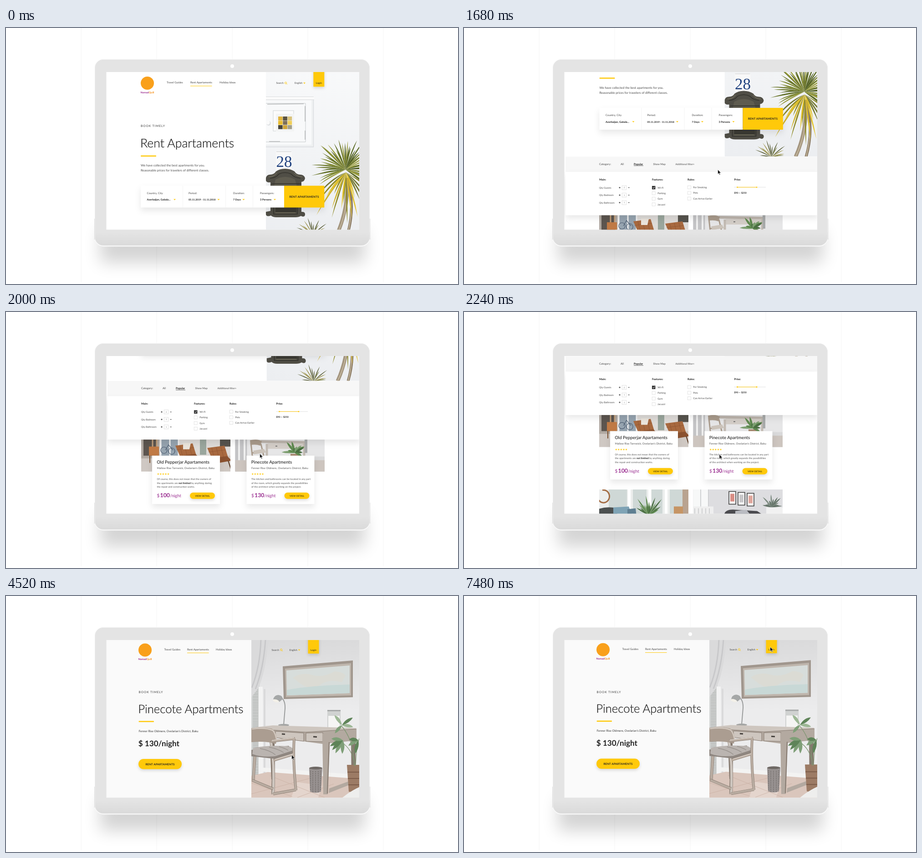
Write an HTML page that moves like this. It is 993 by 564 pixels and loops after 8 s.

```html
<!DOCTYPE html>
<html lang="en">
<head>
<meta charset="utf-8">
<title>Apartment booking</title>
<style>
html, body { margin: 0; width: 100%; height: 100%; overflow: hidden; background: #fff; }
#stage { display: block; width: 100vw; height: 100vh; font-family: Lato, "Open Sans", sans-serif; text-rendering: geometricPrecision; }
text { white-space: pre; }
.card { filter: drop-shadow(0 7px 7px rgba(0,0,0,.09)); }
.lift { filter: drop-shadow(0 3px 3px rgba(0,0,0,.14)); }
.title { font-weight: 300; stroke: #222; stroke-width: .3px; }
.star { font-family: "DejaVu Sans", sans-serif; }
.num { font-family: "Liberation Serif", serif; }
</style>
</head>
<body>
<svg id="stage" viewBox="0 0 993 564"></svg>
<script>
const YELLOW = '#ffc90a', PURPLE = '#98298e', INK = '#484848', DARK = '#222';

// Drawing helpers that return markup
const rect = (x, y, w, h, fill, more = '') => `<rect x="${x}" y="${y}" width="${w}" height="${h}" fill="${fill}" ${more}/>`;
const shape = (d, fill, more = '') => `<path d="${d}" fill="${fill}" ${more}/>`;
const line = (d, color, w = 1, more = '') => `<path d="${d}" fill="none" stroke="${color}" stroke-width="${w}" ${more}/>`;
const oval = (x, y, rx, ry, fill, more = '') => `<ellipse cx="${x}" cy="${y}" rx="${rx}" ry="${ry}" fill="${fill}" ${more}/>`;
const text = (x, y, size, str, fill = INK, more = '') => `<text x="${x}" y="${y}" font-size="${size}" fill="${fill}" ${more}>${str}</text>`;
const bold = (x, y, size, str, fill = DARK, more = '') => text(x, y, size, str, fill, 'font-weight="700" ' + more);
const title = (x, y, size, str) => text(x, y, size, str, DARK, 'class="title"');
const mid = 'text-anchor="middle"';
const photo = (x, y, w, h, art) =>
  `<svg x="${x}" y="${y}" width="${w}" height="${h}" viewBox="${x} ${y} ${w} ${h}">${art}</svg>`;
const caret = (x, y) => shape(`M${x - 2.5} ${y}h5l-2.5 2.7z`, YELLOW);
const fade = (id, a, b, y2 = 1) =>
  `<linearGradient id="${id}" x2="0" y2="${y2}"><stop stop-color="${a}"/><stop offset="1" stop-color="${b}"/></linearGradient>`;

let seed = 7;
const rnd = () => (seed = seed * 16807 % 2147483647) / 2147483647;

// A fan of n pointed leaves growing from one point; angles in degrees
function leaves(n, cx, cy, from, to, short, long, width, droop, colors) {
  let out = '';
  for (let i = 0; i < n; i++) {
    const a = (from + (to - from) * (i + rnd()) / n) * Math.PI / 180;
    const len = short + (long - short) * rnd(), c = Math.cos(a), s = Math.sin(a);
    const mx = cx + c * len * .55, my = cy + s * len * .55 - droop * .3;
    const tip = `${cx + c * len} ${cy + s * len + droop * rnd()}`;
    out += shape(`M${cx} ${cy}Q${mx - s * width} ${my + c * width} ${tip}Q${mx + s * width} ${my - c * width} ${cx} ${cy}`,
      colors[Math.floor(rnd() * colors.length)]);
  }
  return out;
}

function header([logo, guides, rent, ideas, search, lang, login], dy) {
  const nav = [[guides, 'Travel Guides'], [rent, 'Rent Apartaments'], [ideas, 'Holiday Ideas']];
  return `<g transform="translate(0 ${dy})">` +
    oval(logo, 121.5, 14.5, 14.5, '#f9a01b') +
    bold(logo, 143.5, 5.6, '<tspan>Nomad</tspan><tspan fill="#f5921e">Quill</tspan>', PURPLE, mid) +
    nav.map(([x, s]) => text(x, 122.3, 6.05, s)).join('') +
    rect(rent, 127.3, 47.5, 1, YELLOW) +
    text(search, 123.4, 5.6, 'Search') +
    line(`M${search + 22.5} 122.5l1.8 1.8`, YELLOW) +
    `<circle cx="${search + 21}" cy="121" r="2" fill="none" stroke="${YELLOW}"/>` +
    text(lang, 123.4, 5.6, 'English') + caret(lang + 21.5, 120.3) +
    rect(login, 85, 24, 44.3, YELLOW, 'class="lift"') +
    text(login + 12, 123.4, 5.5, 'Login', DARK, mid) + '</g>';
}

const kicker = (x, y) => text(x, y, 6.6, 'BOOK TIMELY', INK, 'letter-spacing=".95" font-weight="500"');

function doorPhoto() {
  const tiles = ['#e0b33c', '#5a5340', '#d9c27a', '#e9bd2f', '#7d705a', '#f0cf58', '#46443c', '#cfa63a', '#a3a08c'];
  return rect(571, 97, 205, 358, 'url(#wall)') +
    // cabinet
    rect(571, 158, 104, 104, '#eff1f2') + rect(571, 159, 100, 98, '#f8f9fa') +
    rect(571, 151, 106, 6, '#fbfbfb') + line('M571 158H677M571 151.5H676', '#d9dcde', 1.2) +
    line('M675.5 158V262M571 262H676', '#d9dcdf', 1.4) +
    line('M571 166H658V251H571', '#c6cacc', 1) + line('M574 168l80 -1M657 172v34M657 226v20M578 250h24', '#87898a', .8) +
    rect(587, 182, 45, 45, '#fbfbfb', 'stroke="#cfd3d5"') + rect(593, 189, 40, 39, '#f3f4f4') +
    tiles.map((c, i) => rect(598 + i % 3 * 10.3, 195 + Math.floor(i / 3) * 9.5, 9.6, 8.8, c)).join('') +
    oval(577, 210, 5, 5, '#dfe2e4') + oval(575.5, 208.5, 4.2, 4.2, '#fafafa') +
    // house number
    rect(593, 272, 35, 40, '#f8f8f8') + line('M594 272.5h33', '#cfcfcf') +
    text(611, 306, 35, '28', '#1f417f', mid + ' class="num"') +
    // letter box
    shape('M571 330q2-7 9-7q9 0 13-7q8-6 20-6t21 6q4 7 12 7q9 0 11 8q-1 7-8 8v66q9-1 8 7q-2 6-9 2q-5 3-12 3H594q-8 0-12-4q-9 4-11-2v-6l10-2V340q-9 1-10-4z', '#504e46') +
    shape('M592 334q21-12 43 0l4 14h-50z', '#5f5c50') + rect(592, 388, 46, 18, '#3b3a33') +
    line('M580 331q14-1 19-9q14-7 28 0q6 8 20 9M584 343H648M588 348v62h52v-62', '#33322c', 1.6) +
    line('M577 328q12 0 18-9M633 319q7 9 18 9M592 407h44', '#857f68', 1) +
    // palm
    line('M750 330Q752 400 727 455', '#a3957f', 8) + line('M750 330Q768 395 750 455', '#8b7b65', 6) +
    line('M748 380Q744 420 727 455M757 380Q761 415 750 455', '#c5b79e', 2) +
    leaves(17, 747, 318, 35, 150, 45, 112, 3, 18, ['#d0b32a', '#8d8926', '#e2c126', '#757a34', '#b39a30']) +
    leaves(46, 746, 312, 150, 400, 48, 80, 2.5, 8, ['#5c6b25', '#7d872f', '#4c5a22', '#979a3a', '#6a7629']) +
    leaves(14, 674, 456, 185, 355, 24, 45, 1.6, 4, ['#767b3a', '#9a914a', '#4d5228']);
}

function home() {
  const fields = [[309.5, 370.5, 'Country, City', 'Azerbaijan, Gabala...', 5.8], [401, 467, 'Period:', '05.11.2019 - 11.11.2018', 5.35],
    [499, 522, 'Duration:', '7 Days', 5.6], [558, 590.5, 'Passengers:', '3 Persons', 5.8]];
  return rect(210, 60, 580, 1000, '#fff') +
    photo(571, 97, 206, 357.5, doorPhoto()) +
    header([310.5, 353, 405, 469, 593.5, 634, 675.3], 0) +
    kicker(296, 218.4) +
    title(295, 262.5, 26.7, 'Rent Apartaments') +
    rect(296, 280.7, 34, 2.6, YELLOW, 'rx="1"') +
    text(296, 305.3, 6.8, 'We have collected the best apartments for you.') +
    text(296, 316, 6.8, 'Reasonable prices for travelers of different classes.') +
    `<g class="card">${rect(296, 347.5, 315, 48, '#fff')}${rect(611, 347.5, 88.3, 48, YELLOW)}</g>` +
    line('M388.5 347.5v48M482.5 347.5v48M542.5 347.5v48', '#f3f3f3') +
    fields.map(([x, c, a, b, size]) => text(x, 365.8, 6.05, a) + bold(x, 380.2, size, b) + caret(c, 376.8)).join('') +
    bold(655, 373.8, 6.2, 'RENT APARTAMENTS', DARK, mid + ' letter-spacing=".2"') +
    `<g transform="translate(-1.5 357.5)">${listing()}</g>`;
}

function filters() {
  const box = (x, y) => rect(x, y - 3.5, 7, 7, '#fff', 'stroke="#dcdcdc" stroke-width=".8"');
  const rows = [['Qty Guests', 2], ['Qty Badroom', 1], ['Qty Bathroom', 1]];
  const checks = (x, y, list) => list.map((s, i) => box(x, y + i * 12.35) + text(x + 12, y + 2 + i * 12.35, 5.5, s)).join('');
  return rect(223, 97.5, 555, 34, '#f7f7f7') + rect(223, 131, 555, 95.5, '#fff', 'class="card"') +
    text(297, 115.8, 6.1, 'Category:') + text(344, 115.8, 6.1, 'All') +
    bold(373, 115.8, 5.9, 'Popular') + line('M373 117.3h21', DARK, .7) +
    bold(415.5, 115.8, 5.8, 'Show Map', '#707070') + bold(464.5, 115.8, 5.5, 'Additional filter+', '#707070') +
    [[297, 'Main:'], [413, 'Features:'], [491, 'Rules:'], [593.5, 'Prise:']].map(([x, s]) => bold(x, 149.6, 6, s)).join('') +
    rows.map(([s, n], i) => {
      const y = 165.7 + i * 16.5;
      return text(297, y + 2, 5.4, s) + line(`M340.3 ${y}h3.4m-1.7-1.7v3.4M360.5 ${y}h3.2`, DARK, .9) +
        rect(347.2, y - 4.5, 9.5, 9, '#fff', 'stroke="#dadada" stroke-width=".8"') + text(352, y + 1.7, 4.6, n, '#888', mid);
    }).join('') +
    checks(413.2, 165.5, ['Wi-Fi', 'Parking', 'Gym', 'Jacuzzi']) +
    rect(413, 162, 7.4, 7.4, '#333') + line('M414.7 165.6l1.6 1.7 2.6-3.2', '#fff', 1) +
    checks(491.5, 165, ['For Smoking', 'Pets', 'Can Arrive Earlier']) +
    line('M593.5 164.8h69.5', '#ddd', .9) + line('M600 164.8h43', YELLOW, 1) +
    oval(600.5, 164.8, 1.4, 1.4, YELLOW) + oval(643, 164.8, 1.4, 1.4, YELLOW) +
    bold(593.5, 178.6, 5.1, '$90 — $250');
}

function card(x, id, name, address, lines, price) {
  const t = x + 10.5;
  return rect(x, 262, 149, 106.5, '#fff', 'class="card"') +
    text(t - .3, 279.2, 9.7, name, DARK, 'font-weight="500"') +
    text(t, 291.8, 6.05, address, '#555') +
    text(t, 304.6, 6.2, '★★★★★', YELLOW, 'class="star"') +
    lines.map((s, i) => text(t, 315.6 + i * 8.4, 5.55, s, '#555')).join('') +
    text(t, 353.3, 10, `$<tspan x="${t + 7}" font-size="12.3" font-weight="700">${price}</tspan><tspan font-size="9.4">/night</tspan>`, PURPLE) +
    rect(x + 83, 343.2, 55, 14, YELLOW, `rx="7" class="lift" id="${id}"`) +
    bold(x + 110.5, 352.2, 5, 'VIEW DETAIL', '#4a3c08', mid + ' letter-spacing=".1"');
}

function listing() {
  const leather = '#a8693f', green = ['#5f8a50', '#4a6e42', '#7c9e70'];
  const armchair = (x, y) => shape(`M${x} ${y}l38-5 8 26-34 6z`, leather) + shape(`M${x + 8} ${y + 23}l36-5 10 10-40 7z`, '#8b5230') +
    line(`M${x + 10} ${y}l6 24M${x + 20} ${y - 1}l6 24M${x + 30} ${y - 2}l6 22M${x + 3} ${y + 9}l38-5`, '#8b5230', .7) +
    line(`M${x + 16} ${y + 34}l-6 16M${x + 46} ${y + 28}l6 18`, '#5a3a24', 2);
  const lounge = rect(297, 160, 197, 140, '#dedbd8') + rect(297, 262, 197, 35, '#cfc8c3') +
    rect(297, 222, 40, 46, '#b1a9a2') + rect(302, 222, 30, 40, '#5c554f') + line('M322 222v44M331 222v44', '#c2a07c', 3) +
    rect(339, 222, 40, 41, '#96a4b0') + line('M340 222v40M360 222v40M379 222v40', '#f2f2f2', 3) +
    line('M347 243a7 7 0 1 0 .1 0M364 245a7 7 0 1 0 .1 0M350 250l7-12 10 12', '#4c5c70', 1.2) +
    rect(426, 222, 14, 38, '#9aa69d') + rect(470, 222, 23, 20, '#57544e') +
    rect(314, 242, 22, 20, '#c07a45') + line('M316 262v16M334 262v16', '#7a5030', 2) +
    armchair(372, 240) + armchair(442, 245) + shape('M389 234h17l-3 14h-14z', '#ebe5dc');
  const study = rect(503, 160, 198, 140, '#d9d9da') + rect(503, 222, 26, 75, '#c4c4c6') + line('M512 222v75M524 222v75', '#efefef', 4) +
    rect(530, 222, 171, 42, '#e6e6e7') + rect(503, 272, 198, 30, '#cdc5bf') +
    shape('M560 228l98 2v6l-100-2z', '#bdb5ad') + rect(575, 235, 80, 12, '#d3cdc7') + line('M592 241h4M628 241h4', '#555', 1.5) +
    line('M655 234v54M573 236v30', '#c3bbb3', 5) + shape('M536 228q16-4 26 2l-3 10q-12-4-22-1z', '#a99b8c') +
    line('M538 234l5 45M560 236l8 34M540 256l28-2', '#a99b8c', 3) + shape('M543 251l24-4 4 8-26 4z', '#cbc3ba') +
    rect(625, 258, 22, 26, '#a5866d') + leaves(12, 634, 256, 170, 380, 14, 32, 5, 4, green) + rect(656, 222, 6, 34, '#a8aaaa');
  const parlour = rect(297, 390, 197, 110, '#eceeed') + [[318, 40], [371, 30], [412, 24], [452, 30]].map(([x, w]) => rect(x, 390, w, 56, '#cfd8d6')).join('') +
    line('M363 390v56M408 390v56M444 390v56', '#fff', 6) + line('M304 392a13 14 0 1 1-8 22', '#a56d45', 3) +
    shape('M297 433q20-6 38-1l4 28h-42z', '#4c5050') + shape('M328 430l34-2 8 22-42 3z', '#7fa3b5') + shape('M359 434l18-2 2 18h-20z', '#5f7f92') +
    leaves(16, 406, 447, 205, 335, 22, 46, 3, 0, green) + rect(480, 390, 14, 60, '#b9a390') + rect(461, 428, 20, 20, '#c69565');
  const bedroom = rect(503, 390, 198, 110, '#dddde0') + rect(503, 390, 34, 45, '#f7f8f8') + line('M520 390v42M537 390v42', '#cfd1d3', 2) +
    rect(503, 428, 45, 30, '#efefef') + line('M507 432v14M515 432v14M523 432v14M531 432v14M539 432v14', '#d0d1d2', 2) +
    [[582, 395, '#d98f86'], [602, 397, '#c9c8ca'], [622, 399, '#e0a79d']].map(([x, y, c]) =>
      rect(x, y, 15, 28, '#fafafa', 'stroke="#363636" stroke-width="1.5"') + rect(x + 3, y + 5, 9, 17, c)).join('') +
    shape('M572 444q4-10 22-9l50 3 12 8v10h-84z', '#4b4b4f') + shape('M596 438l24-3 10 12h-34z', '#b9bbc1') +
    leaves(13, 676, 430, 190, 350, 14, 34, 3, 3, ['#7c8a80', '#647468']) + rect(664, 430, 36, 20, '#f1f1f1');
  return photo(297, 180, 196, 117, lounge) + photo(503.5, 180, 196.5, 117, study) +
    photo(297, 390.5, 196, 100, parlour) + photo(503.5, 390.5, 196.5, 100, bedroom) +
    card(321, 'first', 'Old Pepperjar Apartaments', "Mallow Rise Tornwick, Ovelarian's District, Baku",
      ['Of course, this does not mean that the owners of', 'the apartments are <tspan font-weight="700" fill="#222">not limited</tspan> by anything during', 'the repair and construction works.'], 100) +
    card(528.5, 'second', 'Pinecote Apartments', "Fenner Rise Oldmere, Ovelarian's District, Baku",
      ['The kitchen and bathrooms can be located in any part', 'of the room, which greatly expands the possibilities', 'of the architect when working on the project.'], 130) +
    filters();
}

function deskPhoto() {
  const wood = '#b3a9a0', pale = '#cec6bf', deep = '#85796f', green = ['#7f9f78', '#5f8459', '#9db795'];
  const beam = (d, w, color = '#b9aca1') => line(d, deep, w + 1.4, 'stroke-linejoin="round"') + line(d, color, w, 'stroke-linejoin="round"');
  return rect(539, 90, 237, 360, 'url(#room)') +
    // window and curtain
    rect(539, 90, 18, 310, '#d3d5d4') + line('M548 150v245', '#b2b5b3', 12, 'stroke-dasharray="1.5 2"') +
    shape('M539 90h38q-6 80-24 115l-14 18z', '#dadadb') + line('M560 97q-2 60-20 105M570 97q-4 62-22 108', '#c8c8ca', 3) +
    rect(555, 200, 9, 200, '#f3f3f3') + rect(566, 205, 4, 190, '#dadadb') +
    // floor
    shape('M539 396l40-9 197 14v50H539z', '#dac6bc') + shape('M564 378l212 16v9l-212-16z', '#f3f3f2') +
    shape('M640 410l55 8-12 34h-60z', '#e4d5cd') +
    line('M539 412l90 30M580 396l120 48M539 436l150-40M640 444l80-30', '#c9b0a4', .8) +
    // framed map
    shape('M608 155l154-13v81l-152 4z', '#a0968d') + shape('M613 160l145-12v71l-143 4z', '#bfb6ad') +
    shape('M616 164l139-11v61l-138 5z', '#d7dddb') + shape('M630 180q20-13 43-6t49-8q18 1 24 9l-8 15q-30-8-48 6t-42-2z', '#dcdbd2', 'opacity=".75"') +
    shape('M617 207q50-10 138-12v19l-138 5z', '#c8d8d6') +
    // lamp
    line('M600 222q14 4 13 26l-3 36', '#999b9b', 2) + shape('M587 229q1-10 11-11q10 1 10 9l-7 6z', '#a5a7a7') +
    oval(593, 231, 7, 3, '#f3f0e8', 'transform="rotate(16 593 231)"') + oval(610, 284.5, 12, 2.7, '#a4a5a4') +
    // jar
    rect(706, 252, 29, 39, '#d0d2d1', 'rx="2"') + rect(708, 264, 25, 27, '#f5f5f4') + rect(706, 251, 29, 3, '#a7a9a9') +
    // desk
    shape('M579 302l11 2v100h-7z', deep) + shape('M758 318l10-1v95h-9z', deep) +
    shape('M549 289l37-4 184 6-10 8-60 5-151-11z', pale) + shape('M549 293l109 7 112-7v25l-74 8-147-20z', wood) +
    shape('M592 298l62 4v18l-62-8z', pale, `stroke="${deep}"`) + shape('M659 302l37-1v20l-37-1z', pale, `stroke="${deep}"`) +
    line('M606 304l7 .5M675 310l8 .5', '#48433f', 3) + line('M549 293l109 7 112-7', deep, 1) +
    shape('M695 303h17l-5 134h-10z', wood) + line('M710 322l-4 113', deep, 2) +
    shape('M710 424l60-22v8l-61 24z', wood) +
    // basket
    shape('M666 379q14-5 29 0l-3 52q-11 5-24 0z', '#979190') + oval(680.5, 379, 14.3, 3, '#6e6864') +
    line('M669 385v44M674 386v46M680 386v46M686 386v46M691 385v44', '#716b68', 1.6, 'stroke-dasharray="2 2"') +
    // plant
    shape('M749 372h27v63l-23-4z', '#9c7b65') + line('M750 388h26M751 402h25M752 416h24', '#7c5c49', 2) +
    line('M765 374q0-55-28-88M766 374q-4-40-36-56M768 374q2-45 8-60', '#7d9570', 1.3) +
    leaves(4, 738, 285, 130, 400, 20, 32, 7, 4, green) +
    leaves(5, 740, 318, 80, 200, 24, 34, 8, 4, green) +
    leaves(3, 774, 318, 90, 230, 20, 32, 8, 4, green) +
    shape('M738 445q18-15 38-24v24z', '#eeeeed') +
    // chair
    beam('M547 349l-4 60M588 352l-2 85', 5) + beam('M582 318q8 54 5 116', 5, pale) +
    shape('M539 291q25-3 44 1q8 3 12 21l-2 13q-20-7-54-4z', '#ab9d91') + line('M540 293q30-4 46 3q6 6 9 24', '#d3c9c0', 2.5) +
    shape('M539 339l82-9 14 16-42 13-54-6z', '#8f8781') + shape('M543 335q32-7 76-4q12 2 12 9l-40 13q-30 3-50-5z', '#bab4b0') +
    line('M558 336q22 4 34 14M578 333q20 4 32 12M600 332q12 3 20 8', '#99938e', 1.4) +
    beam('M583 320l52-6M633 314q-3 50 4 114M588 362l46-14M587 436l50-9M541 406l46 19', 4.5) +
    line('M584 318l49-6M591 360l40-12', '#dcd3cb', 1.5);
}

function detail() {
  return rect(210, 85, 580, 380, '#fafafa') + photo(539, 90, 240, 360, deskPhoto()) +
    header([305.5, 347.5, 398, 461, 583.5, 622.5, 663.5], -2.5) +
    kicker(291.5, 214.4) +
    title(290.3, 257.7, 25.7, 'Pinecote Apartments') +
    rect(291.5, 275.2, 33.5, 2.5, YELLOW, 'rx="1"') +
    text(291.5, 299.7, 6.35, "Fenner Rise Oldmere, Ovelarian's District, Baku", '#333') +
    bold(290.8, 331, 17.1, '$ 130/night') +
    rect(291, 359, 95, 22.5, YELLOW, 'rx="11.2" class="lift"') +
    bold(338.5, 372.5, 6.1, 'RENT APARTAMENTS', DARK, mid + ' letter-spacing=".2"');
}

const stage = document.getElementById('stage');
stage.innerHTML = `<defs>
  ${fade('wall', '#f8f9fa', '#eceef1')}${fade('room', '#d9d9da', '#ececed', .45)}${fade('chin', '#e4e4e4', '#dadada')}
  <filter id="blur" x="-20%" y="-100%" width="140%" height="300%"><feGaussianBlur stdDeviation="18"/></filter>
  <clipPath id="screen">${rect(220.5, 97, 555.5, 347.3, '#000')}</clipPath></defs>` +
  rect(0, 0, 993, 564, '#fff') +
  line([165, 331, 497, 663, 829].map(x => `M${x} 0V560`).join(''), '#f4f4f4') +
  rect(207, 445, 581, 72, '#000', 'opacity=".17" filter="url(#blur)"') +
  line('M195 420v46M799.5 420v46', '#cfcfcf', 1.4) +
  rect(195, 70, 604.5, 411.5, '#fafafa', 'rx="19"') + rect(195.5, 69.5, 603, 409.5, '#e4e4e4', 'rx="18" stroke="#eee"') +
  shape('M196 450H798.5V461a18 18 0 0 1-18 18H214a18 18 0 0 1-18-18z', 'url(#chin)') +
  oval(497, 84, 4, 4, '#fff') +
  `<g clip-path="url(#screen)"><g id="home">${home()}</g><g id="detail">${detail()}</g></g>` +
  shape('M0 0V10L2.4 7.9 4 11.7 5.6 11 4 7.3H7.2Z', '#111', 'id="cursor" stroke="#fff" stroke-width=".7"');

const [homeView, detailView, cursor, button] = ['home', 'detail', 'cursor', 'second'].map(id => document.getElementById(id));

// Rows are [time, x, y]
const scroll = [[1320, 0, 0], [1360, 0, 3], [1440, .4, 40], [1680, 1.5, 171.5], [2000, 1.5, 303], [2080, 1.5, 334], [2160, 1.5, 357], [2760, 1.5, 357.5]];
const settle = [[4640, 0, 0], [5480, 0, .7]];
const pointer = [[120, 849, 154], [320, 550, 314], [720, 550, 314], [1120, 556, 312], [1360, 556, 312], [1680, 557.5, 312],
  [2160, 557.5, 312], [2760, 626, 346], [3680, 626, 346], [3760, 627.5, 350], [4640, 627.5, 350], [5480, 644, 222], [5680, 640, 199],
  [5800, 640, 199], [6000, 636, 187], [6640, 665, 114], [6760, 669, 112], [7400, 669, 112], [7480, 672.5, 112]];
const smooth = p => p * p * (3 - 2 * p);

function at(rows, t, ease = p => p) {
  const i = rows.findIndex(r => r[0] > t);
  if (i < 1) return rows.at(i).slice(1);
  const [a, b] = [rows[i - 1], rows[i]], p = ease((t - a[0]) / (b[0] - a[0]));
  return [a[1] + (b[1] - a[1]) * p, a[2] + (b[2] - a[2]) * p];
}
const move = (el, x, y) => el.setAttribute('transform', `translate(${x} ${y})`);
const show = (el, on) => el.setAttribute('display', on ? 'inline' : 'none');

const start = performance.now();
function draw() {
  const t = Math.floor((performance.now() - start) % 8000 / 40) * 40;
  const [sx, sy] = at(scroll, t), booked = t >= 4520;
  move(homeView, sx, -sy);
  move(detailView, 0, -at(settle, t)[1]);
  move(cursor, ...at(pointer, t, smooth));
  show(homeView, !booked);
  show(detailView, booked);
  show(cursor, t >= 120);
  button.setAttribute('fill', t >= 2680 ? '#ffb90f' : YELLOW);
  requestAnimationFrame(draw);
}
draw();
</script>
</body>
</html>
```
